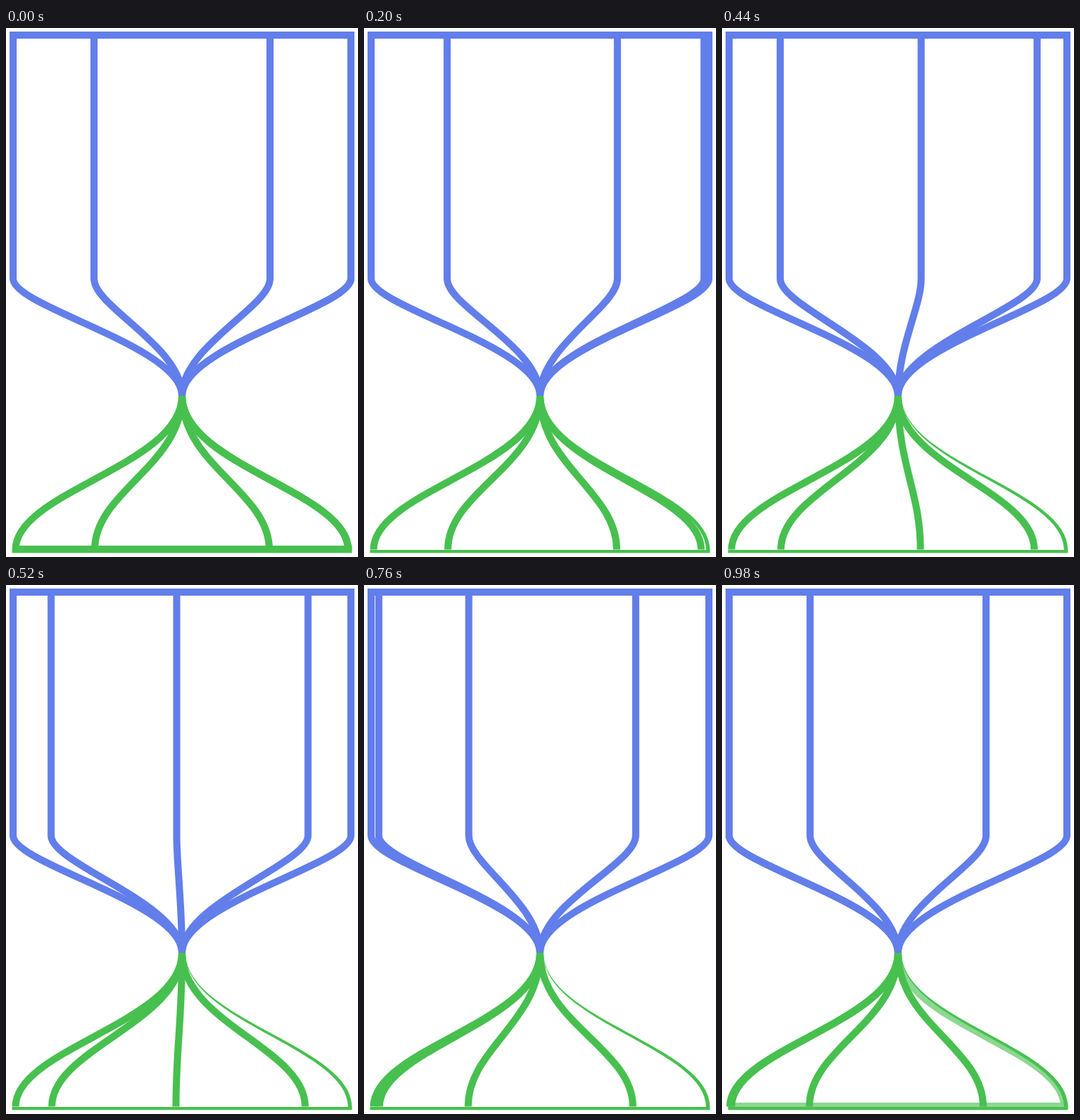
An HTML page for the animation above (1 s loop, 496x745 px).

```html
<!DOCTYPE html>
<html lang="en">
<head>
<meta charset="utf-8">
<title>Hourglass flow</title>
<style>
  html, body { margin: 0; width: 100%; height: 100%; overflow: hidden; background: #fff; }
  svg { display: block; width: 100%; height: 100%; }
  .line { fill: none; stroke-width: 10; }
  .top { stroke: #627eea; }
  .base { stroke: #47c04f; }
  .solid { fill: #47c04f; }

  .move { animation: 1s cubic-bezier(.524, 0, .493, 1) infinite; }
  .t1 { animation-name: t1; }
  .t2 { animation-name: t2; }
  .t3 { animation-name: t3; }
  .b1 { animation-name: b1; }
  .b2 { animation-name: b2; }
  .b3 { animation-name: b3; }
  .flash { animation: flash 1s linear infinite; }

  @keyframes t1 {
    from { d: path("M124 10V353C124 393 248 448 248 518"); }
    to   { d: path("M10 10V353C10 393 248 448 248 518"); }
  }
  @keyframes t2 {
    from { d: path("M372 10V353C372 393 248 448 248 518"); }
    to   { d: path("M124 10V353C124 393 248 448 248 518"); }
  }
  @keyframes t3 {
    from { d: path("M486 10V353C486 393 248 448 248 518"); }
    to   { d: path("M372 10V353C372 393 248 448 248 518"); }
  }
  @keyframes b1 {
    from { d: path("M248 518C248 616 125 653 125 734.5"); }
    to   { d: path("M248 518C248 616 11 653 11 734.5"); }
  }
  @keyframes b2 {
    from { d: path("M248 518C248 616 371 653 371 734.5"); }
    to   { d: path("M248 518C248 616 123 653 123 734.5"); }
  }
  @keyframes b3 {
    from { d: path("M248 518C248 616 482 653 482 734.5"); }
    to   { d: path("M248 518C248 616 368 653 368 734.5"); }
  }
  @keyframes flash {
    0%, 1.99% { opacity: 1; }
    2%, 95% { opacity: 0; }
    100% { opacity: 1; }
  }
</style>
</head>
<body>
<svg viewBox="0 0 496 745">
  <!-- fades in just before the loop closes -->
  <g class="flash">
    <path class="line base" d="M248 518C248 616 482 653 482 734.5"/>
    <rect class="solid" x="9" y="729" width="478.5" height="6.5"/>
  </g>

  <!-- lower half -->
  <rect class="solid" x="8.5" y="735" width="479" height="4.3"/>
  <path class="solid" d="M253 518C253 612 487.5 649 487.5 735H482C482 652 252.5 615 252.5 518Z"/>
  <path class="line base" d="M248 518C248 616 13.5 653 13.5 734.5"/>
  <path class="line base move b1" d="M248 518C248 616 125 653 125 734.5"/>
  <path class="line base move b2" d="M248 518C248 616 371 653 371 734.5"/>
  <path class="line base move b3" d="M248 518C248 616 482 653 482 734.5"/>

  <!-- upper half -->
  <path class="line top" d="M5 10H491"/>
  <path class="line top" d="M10 10V353C10 393 248 448 248 518"/>
  <path class="line top" d="M486 10V353C486 393 248 448 248 518"/>
  <path class="line top move t1" d="M124 10V353C124 393 248 448 248 518"/>
  <path class="line top move t2" d="M372 10V353C372 393 248 448 248 518"/>
  <path class="line top move t3" d="M486 10V353C486 393 248 448 248 518"/>
</svg>
</body>
</html>
```
